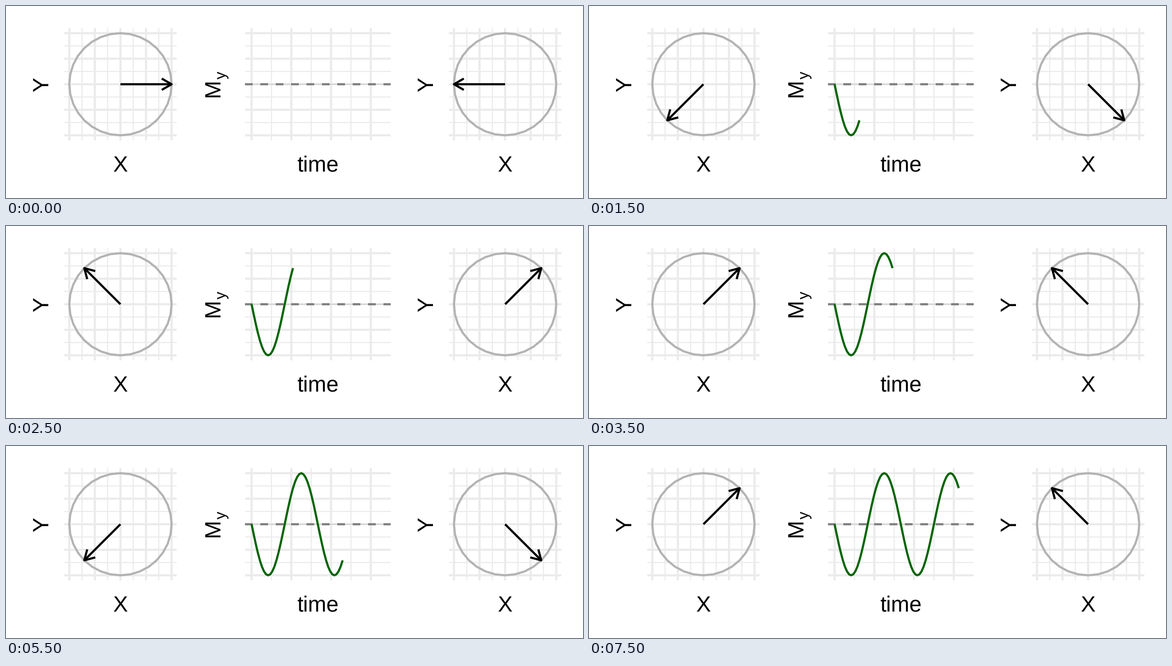
A matplotlib script for the animation above (8000 ms loop, 1200 px wide and 400 px high).

```python
import numpy as np
import matplotlib.pyplot as plt
from matplotlib.animation import FuncAnimation

plt.rcParams["font.family"] = "Liberation Sans"
plt.rcParams["text.hinting"] = "none"

PT = 0.72                       # points per pixel at 100 dpi
FRAMES, INTERVAL = 16, 500
STEP = np.pi / 4                # rotation per frame
TOP, BOTTOM, MID = 46, 280, 163
RADIUS = (BOTTOM - TOP) / 2.2
LEFT_X, RIGHT_X = 238, 1038
PLOT_LEFT, PLOT_RIGHT = 497, 800
TIME_SPAN = (PLOT_RIGHT - PLOT_LEFT) / 1.1
TIME_START = PLOT_LEFT + 0.05 * TIME_SPAN
THICK, THIN = 4.45, 2.22
HEAD = 23.6                     # arrow head side length
FONT = 45.83

fig = plt.figure(figsize=(12, 4), dpi=100, facecolor="white")
ax = fig.add_axes([0, 0, 1, 1])
ax.set(xlim=(0, 1200), ylim=(400, 0))
ax.axis("off")


def stroke(x, y, color, width=THICK, **kw):
    line, = ax.plot(x, y, color=color, lw=width * PT, solid_capstyle="butt",
                    solid_joinstyle="round", dash_capstyle="butt",
                    snap=False, **kw)
    return line


def grid(left, right, major_x, minor_x):
    levels = MID + RADIUS * np.linspace(-1, 1, 9)
    for xs, ys, width in ((minor_x, levels[1::2], THIN),
                          (major_x, levels[::2], THICK)):
        for y in ys:
            stroke([left, right], [y, y], "#ebebeb", width)
        for x in xs:
            stroke([x, x], [TOP, BOTTOM], "#ebebeb", width)


def label(x, y, text, size=FONT, rotation=0, ha="center"):
    ax.text(x, y, text, fontsize=size * PT, rotation=rotation, ha=ha,
            va="baseline", rotation_mode="anchor", color="black")


def dial(cx):
    ticks = cx + RADIUS * np.linspace(-1, 1, 9)
    grid(cx - 117, cx + 117, ticks[::2], ticks[1::2])
    a = np.linspace(0, 2 * np.pi, 33)
    stroke(cx + RADIUS * np.cos(a), MID + RADIUS * np.sin(a), "#b3b3b3")
    label(cx, 345, "X")
    label(cx - 150, MID, "Y", rotation=90)
    return stroke([], [], "black"), stroke([], [], "black")


def point_arrow(arrow, cx, angle):
    shaft, head = arrow
    tip_x, tip_y = cx + RADIUS * np.cos(angle), MID - RADIUS * np.sin(angle)
    shaft.set_data([cx, tip_x], [MID, tip_y])
    barbs = angle + np.pi + np.array([-1, 0, 1]) * np.pi / 6
    reach = HEAD * np.array([1, 0, 1])
    head.set_data(tip_x + reach * np.cos(barbs), tip_y - reach * np.sin(barbs))


left_arrow = dial(LEFT_X)
right_arrow = dial(RIGHT_X)

ticks = TIME_START + 0.15 * TIME_SPAN * np.arange(7)
grid(PLOT_LEFT, PLOT_RIGHT, ticks[::2], ticks[1::2])
stroke([PLOT_LEFT, PLOT_RIGHT], [MID, MID], "#b8b8b8", 1)
stroke([PLOT_LEFT, PLOT_RIGHT], [MID, MID], "#7f7f7f",
       linestyle=(0, (16 / THICK, 16 / THICK)))
label((PLOT_LEFT + PLOT_RIGHT) / 2, 345, "time")
label(443, 190.5, "M", rotation=90, ha="left")
label(457, 151.5, "y", FONT * 0.7, rotation=90, ha="left")
signal = stroke([], [], "#006400")


def draw(frame):
    point_arrow(left_arrow, LEFT_X, -frame * STEP)
    point_arrow(right_arrow, RIGHT_X, np.pi + frame * STEP)
    k = np.arange(4 * frame + 1) if frame else np.array([])
    signal.set_data(TIME_START + TIME_SPAN * k / (4 * FRAMES),
                    MID + RADIUS * np.sin(k * STEP / 4))
    return [*left_arrow, *right_arrow, signal]


anim = FuncAnimation(fig, draw, frames=FRAMES, interval=INTERVAL,
                     init_func=lambda: draw(0), repeat=True, repeat_delay=0)
plt.show()
```
